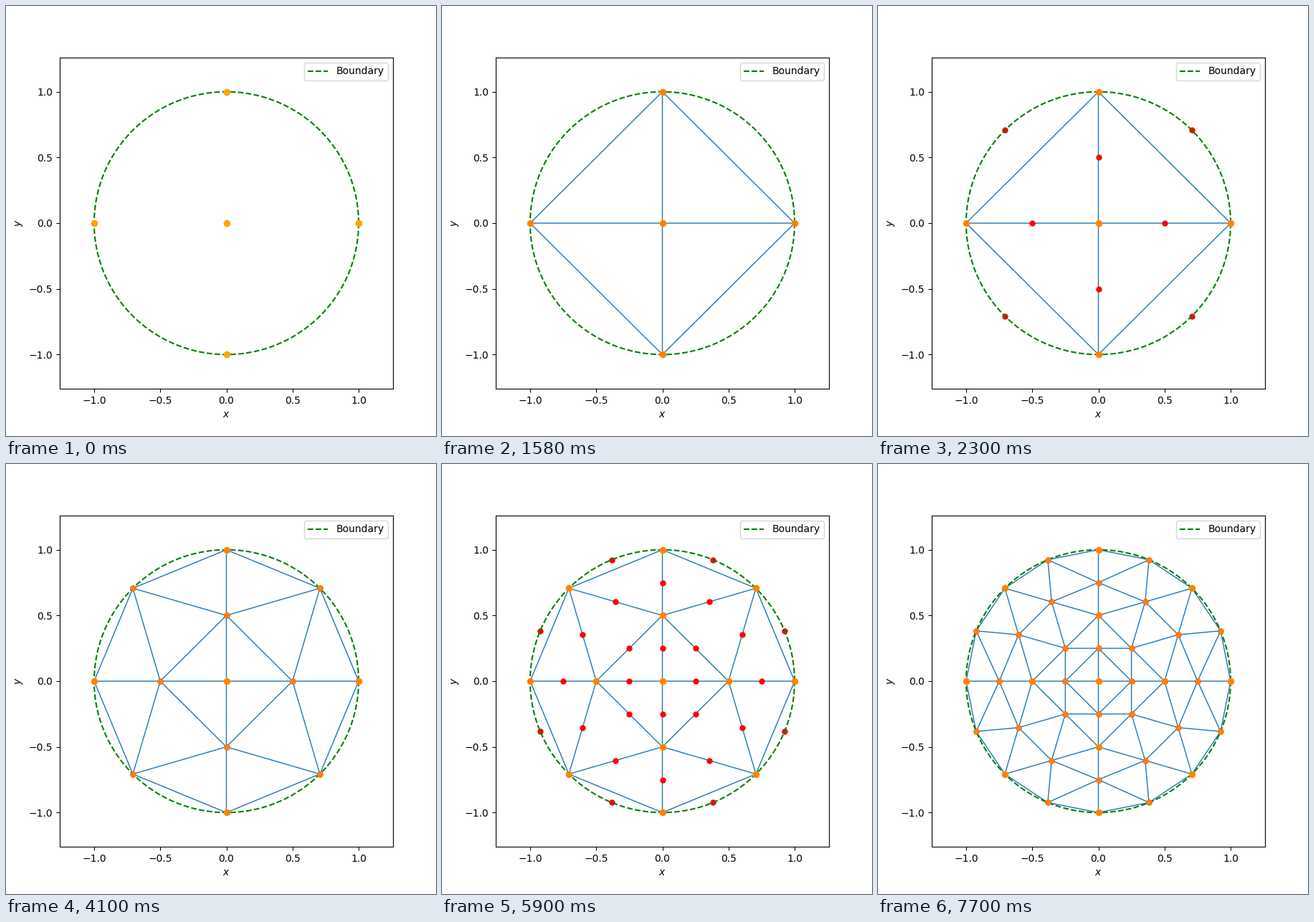
Recreate the animation shown at these times as a matplotlib script. Size 600 px wide and 600 px high, loop 8 s.

```python
import numpy as np
import matplotlib.pyplot as plt
from matplotlib.animation import FuncAnimation

INTERVAL = 100
FRAMES = 80
CHANGES = [5, 23, 41, 59, 77]  # frame numbers at which the stage advances


def edges_of(triangles):
    """Map each edge to the number of triangles sharing it."""
    count = {}
    for a, b, c in triangles:
        for p, q in ((a, b), (b, c), (c, a)):
            key = (min(p, q), max(p, q))
            count[key] = count.get(key, 0) + 1
    return count


def refine(points, triangles):
    """Split every triangle in four, pushing boundary midpoints onto the circle."""
    points = list(points)
    middle = {}
    for (p, q), shared in edges_of(triangles).items():
        mid = (points[p] + points[q]) / 2
        if shared == 1:
            mid = mid / np.hypot(*mid)
        middle[p, q] = len(points)
        points.append(mid)

    def mid_of(p, q):
        return middle[min(p, q), max(p, q)]

    finer = []
    for a, b, c in triangles:
        ab, bc, ca = mid_of(a, b), mid_of(b, c), mid_of(c, a)
        finer += [(a, ab, ca), (ab, b, bc), (ca, bc, c), (ab, bc, ca)]
    return np.array(points), finer


def wireframe(points, triangles):
    gap = [np.nan, np.nan]
    path = [v for p, q in edges_of(triangles) for v in (points[p], points[q], gap)]
    return np.array(path).T


corners = np.array([[0, 0], [1, 0], [0, 1], [-1, 0], [0, -1]], float)
meshes = [(corners, [(0, 1, 2), (0, 2, 3), (0, 3, 4), (0, 4, 1)])]
for _ in range(2):
    meshes.append(refine(*meshes[-1]))
wires = [wireframe(*mesh) for mesh in meshes]

fig, ax = plt.subplots(figsize=(6, 6), dpi=100)
fig.subplots_adjust(left=0.125, right=0.9, bottom=0.11, top=0.88)
ax.set(xlim=(-1.26, 1.26), ylim=(-1.26, 1.26), xlabel="$x$", ylabel="$y$")

angle = np.linspace(0, 2 * np.pi, 400)
ax.plot(np.cos(angle), np.sin(angle), "--", color="green", label="Boundary", zorder=2.2)
ax.legend(loc="upper right")

mesh_lines, = ax.plot([], [], color="C0", lw=1, zorder=2)
new_points, = ax.plot([], [], "o", color="red", ms=5, zorder=2.1)
vertices, = ax.plot([], [], "o", color="orange", ms=6, zorder=2.3)
nodes, = ax.plot([], [], "o", color="C1", ms=5, zorder=2.4)


def update(frame):
    stage = int(np.searchsorted(CHANGES, frame, side="right"))
    base = max(stage // 2 - 1, 0)
    known = meshes[base][0]
    vertices.set_data(*known.T)

    added = meshes[base + 1][0][len(known):] if stage >= 2 else known[:0]
    new_points.set_data(*added.T)

    if stage:
        level = (stage - 1) // 2
        mesh_lines.set_data(*wires[level])
        nodes.set_data(*meshes[level][0].T)
    else:
        mesh_lines.set_data([], [])
        nodes.set_data([], [])
    return mesh_lines, new_points, vertices, nodes


anim = FuncAnimation(fig, update, frames=FRAMES, interval=INTERVAL,
                     repeat=True, repeat_delay=0, blit=False)
plt.show()
```
